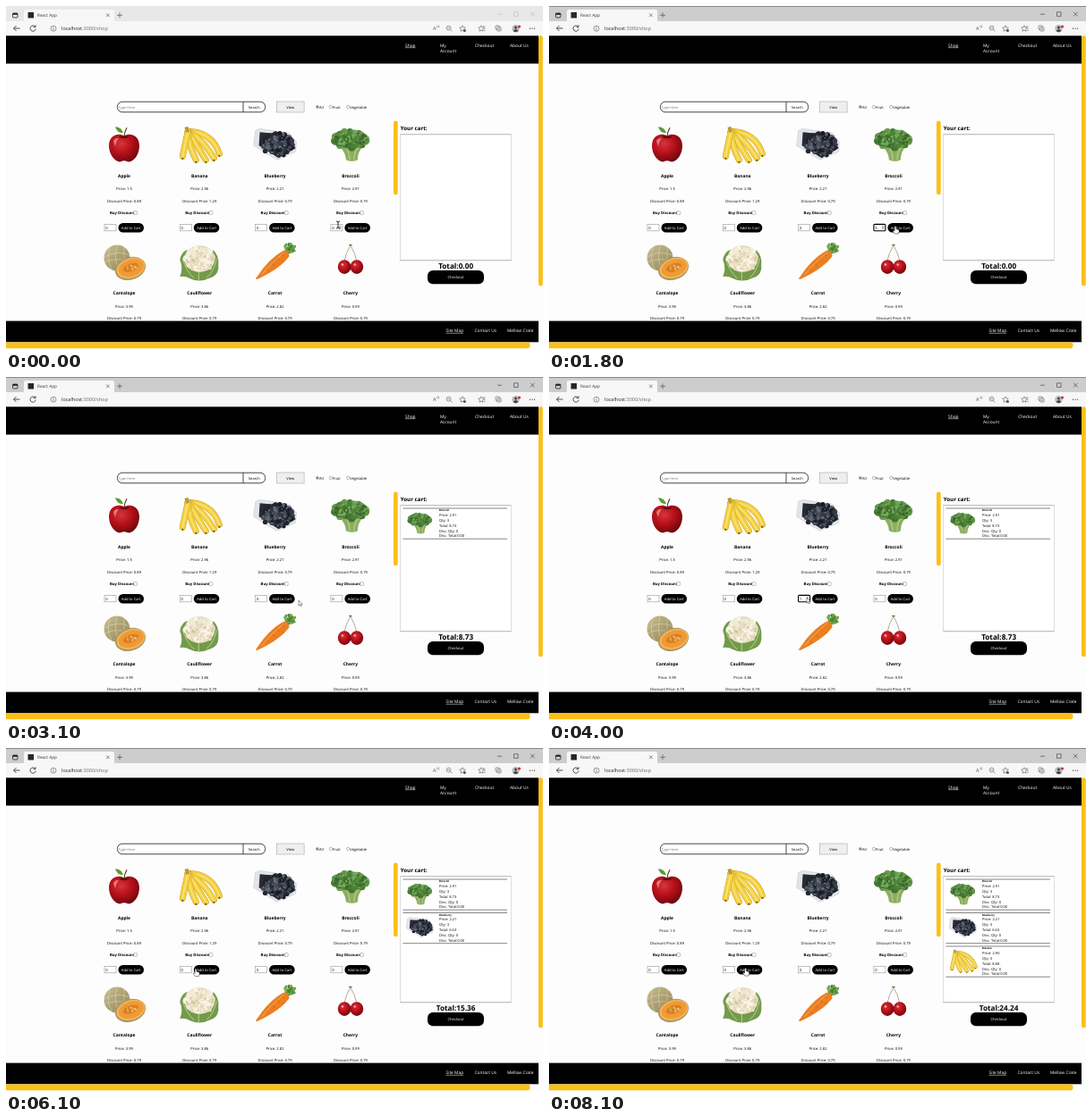
Animation of 600 by 384 pixels, one loop 8500 ms. Source, as an HTML page:

```html
<!DOCTYPE html>
<html lang="en">
<head>
<meta charset="utf-8">
<title>Shop</title>
<style>
html, body { margin: 0; width: 100%; height: 100%; overflow: hidden; background: #fdfdfd; }
svg { display: block; width: 600px; height: 384px; }
text { font-family: "Open Sans", "Noto Sans", sans-serif; text-rendering: geometricPrecision; white-space: pre; }
</style>
</head>
<body>
<svg id="stage" viewBox="0 0 600 384">
  <defs>
    <radialGradient id="red" cx=".4" cy=".35" r=".7">
      <stop offset="0" stop-color="#d8343a"/><stop offset=".5" stop-color="#b5101a"/><stop offset="1" stop-color="#6a060c"/>
    </radialGradient>
    <linearGradient id="rind" x2="1" y2="1">
      <stop offset="0" stop-color="#c9bd92"/><stop offset="1" stop-color="#8f8358"/>
    </linearGradient>
  </defs>
  <rect id="strip" width="600" height="18"/>
  <g id="page"></g>
  <g id="live"></g>
</svg>
<script>
const LOOP = 8500, STEP = 100;
const [strip, page, live] = ['strip', 'page', 'live'].map(id => document.getElementById(id));

const text = (x, y, s, size, o = '') => `<text x="${x}" y="${y}" font-size="${size}" ${o}>${s}</text>`;
const rect = (x, y, w, h, fill, o = '') => `<rect x="${x}" y="${y}" width="${w}" height="${h}" fill="${fill}" ${o}/>`;
const dot = (x, y, r, fill, o = '') => `<circle cx="${x}" cy="${y}" r="${r}" fill="${fill}" ${o}/>`;
const oval = (x, y, rx, ry, turn, fill) =>
  `<ellipse rx="${rx}" ry="${ry}" fill="${fill}" transform="translate(${x} ${y}) rotate(${turn})"/>`;
const path = (d, fill, o = '') => `<path d="${d}" fill="${fill}" ${o}/>`;
const line = (d, color, w = 0.8, o = '') => path(d, 'none', `stroke="${color}" stroke-width="${w}" ${o}`);
const at = (x, y, s, body) => `<g transform="translate(${x} ${y}) scale(${s})">${body}</g>`;
const mid = 'text-anchor="middle"', bold = 'font-weight="700"', white = 'fill="#fff"', round = 'stroke-linecap="round"';

let seed = 7;
const rnd = () => (seed = seed * 16807 % 2147483647) / 2147483647;

// Round blobs scattered over an ellipse
function blobs(n, cx, cy, rx, ry, r, colors) {
  let s = '';
  for (let i = 0; i < n; i++) {
    const a = rnd() * 6.283, d = Math.sqrt(rnd());
    s += dot((cx + rx * d * Math.cos(a)).toFixed(1), (cy + ry * d * Math.sin(a)).toFixed(1),
      (r * (0.7 + rnd() * 0.6)).toFixed(1), colors[Math.floor(rnd() * colors.length)]);
  }
  return s;
}

// One banana hanging from the stem: bend point, then tip
function banana(bx, by, x, y) {
  const d = `M-13-15Q${bx} ${by} ${x} ${y}`;
  return line(d, '#c39a22', 7, round) + line(d, '#f4d03f', 6.2, round) +
    line(d, '#fae27a', 1.6, round) + dot(x, y + 2.4, 1, '#5a481c');
}

// Pictures, each drawn around 0,0
const art = {
  Apple:
    path('M0-10C-6-14-17-11-17 1C-17 12-9 20-4 19Q0 17 4 19C10 20 17 12 17 1C17-11 6-14 0-10Z', 'url(#red)') +
    path('M-6-9Q0-5 6-9Q0-11-6-9Z', '#5c070c') +
    line('M0-8Q0-14 3-19', '#5b3a1a', 1.2) +
    path('M-1-13Q-3-20-10-20Q-8-13-1-13Z', '#5c9a38') +
    path('M-12-4Q-10-8-6-7Q-9-4-10 2Z', '#efa0a0', 'opacity=".7"'),
  Banana:
    banana(14, -14, 22, 10) + banana(4, -6, 16, 15) + banana(-5, -2, 7, 17) +
    banana(-12, 2, -4, 17) + banana(-16, -2, -19, 13) +
    line('M-15-20L-13-14', '#b99c3a', 4),
  Blueberry:
    path('M-22-16L-17-18L16-13L24-3L23 8L2 17L-24 1Z', '#e2e4e8', 'stroke="#c3c7cc" stroke-width=".5"') +
    path('M-17-14L15-11L23 4L4 15L-18 1Z', '#282b36') +
    blobs(110, 3, 0, 18, 13, 2.3, ['#23262f', '#343945', '#464c5a', '#1a1c24', '#5d6472']) +
    blobs(25, 3, 0, 17, 12, 0.7, ['#8a919e', '#747b88']),
  Broccoli:
    path('M-13 1L15 0Q8 8 8 17Q2 20-5 17Q-5 9-13 1Z', '#8cae60') +
    line('M-1 17Q-1 8-5 2M4 17Q4 8 9 2', '#b3cb89', 1.3) +
    oval(0, -6, 20, 10, 0, '#457532') +
    blobs(100, 0, -6, 19, 9, 3.4, ['#4f8538', '#5d9447', '#427230', '#699f52']) +
    blobs(90, 0, -6, 21, 10, 1.2, ['#386429', '#78ac60', '#4d8138']),
  Cantalope:
    dot(-8, -5, 14.5, 'url(#rind)') +
    line('M-22-6Q-8-14 6-8M-22 0Q-8-6 6-1M-16-16Q-20-4-14 8M-8-19Q-12-4-6 9M0-17Q-1-4 2 7', '#ddd3ae', 0.6) +
    oval(7, 7, 17.5, 12.5, -18, '#a99a62') + oval(7.5, 6.5, 16.3, 11, -18, '#f3b45c') +
    oval(7.8, 6.3, 14.5, 9.2, -18, '#f09a34') + oval(7.5, 5.8, 9, 4.4, -18, '#d77f22') +
    blobs(16, 7.5, 5.8, 7, 2.6, 0.9, ['#f0c27a', '#e5a650']),
  Cauliflower:
    path('M-22-3Q-20-13-13-14L-10 8L13 8L15-14Q22-8 21 3Q22 15 10 18Q0 23-11 18Q-16 15-22 16Q-18 7-22-3Z', '#739a4b') +
    line('M-19-4Q-15 10-6 18M19-4Q16 11 8 17M-1 20V10', '#b9d08e', 1) +
    oval(0, -4, 17, 15, 0, '#e6ddc2') +
    blobs(70, 0, -4, 15, 12, 3.2, ['#f0e9d3', '#f8f3e2', '#e4dabc']) +
    blobs(70, 0, -4, 16, 13, 1, ['#fffbee', '#cfc39d', '#f3ecd8']),
  Carrot:
    line('M12-12Q11-17 13-21M13-12Q18-17 18-22M14-11Q20-14 23-19M14-10Q20-11 23-13', '#5f9440', 1.6) +
    blobs(40, 17, -17, 6, 4.5, 1.2, ['#5f9a3e', '#477f2c', '#76ab52']) +
    path('M9-13Q15-14 16-7Q6 7-20 19Q-23 19-20 16Q-7-4 9-13Z', '#ec7f22') +
    line('M7-10l3 3M2-5l3 3M-3 2l3 2M-9 8l2 2M8-2l2 2', '#c8620f', 0.7) +
    line('M10-11Q-4 0-15 14', '#f6a85e', 1),
  Cherry:
    line('M-7-1Q-5-11 0-19M7-1Q5-11 0-19', '#8c8a62', 0.7) +
    oval(0, -19.3, 2, 0.8, 0, '#7a6a4b') +
    oval(-6.8, 5.2, 7.3, 7.8, 0, 'url(#red)') + oval(7, 5.2, 7.3, 7.8, 0, 'url(#red)') +
    dot(-9, 2.5, 1.2, '#f3b5b5') + dot(4.8, 2.5, 1.2, '#f3b5b5')
};

const goods = [
  ['Apple', '1.5', '0.89'], ['Banana', '2.96', '1.29'], ['Blueberry', '2.21', '0.79'], ['Broccoli', '2.91', '0.79'],
  ['Cantalope', '3.99', '0.79'], ['Cauliflower', '3.86', '0.79'], ['Carrot', '2.82', '0.79'], ['Cherry', '0.99', '0.79']
];
const colX = i => 132 + 84.3 * i;

function product([name, price, disc], i) {
  const x = colX(i % 4), y = i < 4 ? 0 : 131.6;
  return at(x, y + 155.3, 1, art[name]) +
    text(x, y + 191.8, name, 4.9, mid + bold) +
    text(x, y + 206.1, 'Price: ' + price, 4.15, mid) +
    text(x, y + 219.7, 'Discount Price: ' + disc, 4.15, mid) +
    (y ? '' :
      text(x - 16, 233.1, 'Buy Discount', 4.2, bold) +
      rect(x + 10.8, 229.6, 3.8, 3.8, '#fff', 'rx=".6" stroke="#888" stroke-width=".5"') +
      rect(x - 6.5, 243, 28.5, 10.6, '#000', 'rx="5.2"') +
      text(x + 7.8, 249.8, 'Add to Cart', 4.15, mid + white));
}

function browser() {
  const ink = '#555';
  return rect(0, 17, 600, 16.5, '#f7f7f7') +
    path('M18 18Q20 18 20 15V6Q20 4 22 4H119Q121 4 121 6V15Q121 18 123 18Z', '#f7f7f7') +
    rect(7.5, 8, 5.5, 5, 'none', 'rx="1" stroke="#222" stroke-width=".8"') + rect(7.5, 8, 5.5, 1.8, '#222') +
    rect(24.5, 7, 6.5, 6.5, '#24272d') +
    text(35, 12.3, 'React App', 4.7, 'fill="#333"') +
    line('M112 8.5l3.6 3.6m0-3.6l-3.6 3.6M124 10.3h6m-3-3v6', ink, 0.7) +
    line('M8.5 25h7M11.5 22l-3 3l3 3', '#222') +
    line('M32.6 23.2A3.1 3.1 0 1 0 33.2 25.6M33 21.3v2.3h-2.3', '#222') +
    dot(53, 25.2, 3, 'none', 'stroke="#555" stroke-width=".6"') + line('M53 24.6v2.2M53 23v.7', '#555', 0.7) +
    text(62, 27.2, 'localhost<tspan fill="#666">:3000/shop</tspan>', 5.5, 'fill="#222"') +
    text(477, 27.2, 'A', 5.6, `fill="${ink}"`) + line('M481.5 22q1.2 1 0 2.2M483 21.3q1.8 1.6 0 3.4', ink, 0.5) +
    dot(494.6, 24.6, 2.4, 'none', `stroke="${ink}" stroke-width=".6"`) + line('M496.4 26.4l2 2M493.4 24.6h2.4', ink, 0.6) +
    [510, 531].map(x => line(`M${x} 21.8l1 2.1l2.3.3l-1.7 1.6l.4 2.4l-2-1.1l-2 1.1l.4-2.4l-1.7-1.6l2.3-.3z`, ink, 0.6)).join('') +
    dot(512.5, 27.4, 1.5, '#555') + line('M533 23h2.4M534 25.2h1.6M534 27.4h1.6', ink, 0.6) +
    rect(547, 22, 4.4, 4.4, 'none', `rx=".8" stroke="${ink}" stroke-width=".6"`) +
    rect(548.7, 23.6, 4.4, 4.4, '#f7f7f7', `rx=".8" stroke="${ink}" stroke-width=".6"`) + line('M550.9 24.6v2.4m-1.2-1.2h2.4', ink, 0.5) +
    dot(569.5, 25.2, 4.2, '#bdbdbd') + dot(569.5, 24, 1.5, '#444') + path('M566.6 28.1Q569.5 24 572.4 28.1Q569.5 30.4 566.6 28.1Z', '#444') +
    dot(573.5, 23, 1.6, '#cf2b2b') +
    [585.5, 588, 590.5].map(x => dot(x, 25.2, 0.6, '#333')).join('');
}

function shop() {
  const nav = (x, y, s, o = '') => text(x, y, s, 4.85, white + ' ' + o);
  const under = 'text-decoration="underline"', gold = '#fbbf17';
  const radio = (x, s) => dot(x, 112.9, 1.7, '#fff', 'stroke="#777" stroke-width=".5"') + text(x + 2.1, 114.5, s, 4.1);
  return rect(0, 33.3, 595, 31.2, '#000') +
    nav(446, 45.6, 'Shop', under) + nav(485, 45.6, 'My') + nav(485, 51.9, 'Account') +
    nav(524, 45.6, 'Checkout') + nav(563, 45.6, 'About Us') +
    rect(124.4, 107.2, 165.2, 11.6, '#fff', 'rx="5.5" stroke="#333" stroke-width=".9"') + line('M265 107v12', '#333', 0.9) +
    text(125.6, 114.5, 'Type Here', 3.95, 'fill="#777"') + text(277.3, 114.5, 'Search', 4.1, mid) +
    rect(302.5, 107, 30.6, 12, '#efefef', 'stroke="#999" stroke-width=".5"') + text(317.8, 114.5, 'View', 4.1, mid) +
    radio(347.9, 'All') + dot(347.9, 112.9, 0.9, '#444') + radio(362.9, 'Fruit') + radio(382.2, 'Vegetable') +
    goods.map(product).join('') +
    rect(433, 128.5, 4.7, 82.8, gold, 'rx="2.3"') +
    text(440.8, 138.5, 'Your cart:', 6.15, bold) +
    rect(440.7, 143.7, 123.7, 141.2, '#fff', 'stroke="#c8c8c8" stroke-width=".6"') +
    line('M440.5 143.8H564.5M440.5 284.7H564.5', '#b0b0b0', 0.8) +
    rect(471, 296, 63, 15.2, '#000', 'rx="6"') + text(502.5, 305.2, 'Checkout', 4.15, mid + white) +
    rect(0, 352.6, 595, 23.7, '#000') +
    nav(491.5, 364.9, 'Site Map', under) + nav(523.5, 364.9, 'Contact Us') + nav(560, 364.9, 'Mellow Crate') +
    rect(595, 33.3, 4.8, 280, gold, 'rx="2.1"') + rect(-3, 376.5, 588.5, 6.8, gold, 'rx="3"');
}

// Pointer path: time, x, y
const trail = [
  [0, 371, 245], [500, 371, 245], [1100, 373, 247], [1600, 373, 247], [1800, 387, 246.5], [2700, 387, 247],
  [2800, 386, 247], [3100, 327, 250], [3400, 288, 247], [4600, 288, 247], [4900, 300, 247], [5800, 300, 247],
  [6100, 212, 247], [6400, 203, 246], [6500, 203, 246], [6700, 204, 247], [7400, 204, 247], [7700, 219.5, 246.5], [LOOP, 219.5, 246.5]
];
// Column, three spinner clicks, time of adding
const buys = [
  { col: 3, clicks: [1400, 1500, 1700], add: 2500 },
  { col: 2, clicks: [3900, 4100, 4300], add: 5400 },
  { col: 1, clicks: [7000, 7100, 7300], add: 8000 }
];

function pointer(t) {
  const i = trail.findIndex(k => k[0] > t), [t0, x0, y0] = trail[i - 1], [t1, x1, y1] = trail[i];
  const f = (t - t0) / (t1 - t0);
  const x = x0 + (x1 - x0) * f, y = y0 + (y1 - y0) * f;
  const col = Math.round((x - 132) / 84.3), dx = x - colX(col);
  const field = dx > -22 && dx < -9;
  const kind = field && dx < -13.2 ? 'beam' : dx > -6.5 && dx < 22 ? 'hand' : 'arrow';
  return { x, y, kind, hover: field ? col : -1 };
}

const cursors = {
  beam: line('M-2-4Q0-4 0-2.8Q0-4 2-4M0-3V3M-2 4Q0 4 0 2.8Q0 4 2 4', '#111', 0.9),
  arrow: path('M0 0V6L1.4 4.8L2.4 6.9L3.3 6.5L2.5 4.4H4.2Z', '#fff', 'stroke="#333" stroke-width=".5"'),
  hand: path('M-.9.6Q0-.6.9.6V3.2L3.8 4Q4.4 4.4 4.1 6L3.4 8.6H-.6L-2.9 5.4Q-2.6 4.2-.9 5.4Z', '#fff', 'stroke="#222" stroke-width=".5"')
};

function field(col, value, focus, hover) {
  const x = colX(col) - 22;
  return rect(x, 244.4, 13, 7.4, '#fff', focus ? 'rx="1" stroke="#000" stroke-width="1.1"' : 'stroke="#999" stroke-width=".6"') +
    text(x + 1.3, 249.8, value, 4.15) +
    (focus || hover ? rect(x + 8.6, 245.3, 3.4, 5.6, '#f1f1f1') +
      path(`M${x + 9.2} 247.6l1.1-1.5l1.1 1.5zM${x + 9.2} 248.6l1.1 1.5l1.1-1.5z`, '#666') : '');
}

function cartRow({ col }, i) {
  const [name, price] = goods[col], y = 37.5 * i;
  const rows = ['Price: ' + price, 'Qty: 3', 'Total: ' + (price * 3).toFixed(2), 'Disc. Qty: 0', 'Disc. Total:0.00'];
  return line(`M443.5 ${y + 147}H560M443.5 ${y + 181.2}H560`, '#333', 0.6) +
    at(462.4, y + 163.6, 0.64, art[name]) +
    text(484, y + 150.3, name, 2.8, bold) +
    rows.map((s, r) => text(484, y + 155.8 + 5.9 * r, s, 4.05)).join('');
}

function draw(t) {
  const p = pointer(t), active = t >= 1400, cart = buys.filter(b => t >= b.add);
  const total = cart.reduce((s, b) => s + goods[b.col][1] * 3, 0).toFixed(2);
  strip.setAttribute('fill', active ? '#cdcdcd' : '#e8e8e8');
  let s = line('M549 9.2h5M567.5 6.8h4.6v4.6h-4.6zM586 6.8l4.6 4.6m0-4.6l-4.6 4.6', active ? '#333' : '#b5b5b5', 0.6);
  if (active) s += line('M0 .3H600', '#555', 0.7);
  for (let c = 0; c < 4; c++) {
    const b = buys.find(b => b.col === c && t < b.add);
    const n = b ? b.clicks.filter(k => t >= k).length : 0;
    s += field(c, n, n > 0, p.hover === c);
  }
  s += cart.map(cartRow).join('') + text(502.6, 293.6, 'Total:' + total, 8.2, mid + bold);
  live.innerHTML = s + at(p.x, p.y, 1, cursors[p.kind]);
}

page.innerHTML = browser() + shop();
const start = performance.now();
let shown = -1;
function tick() {
  const t = Math.floor((performance.now() - start) % LOOP / STEP) * STEP;
  if (t !== shown) draw(shown = t);
  requestAnimationFrame(tick);
}
tick();
</script>
</body>
</html>
```
